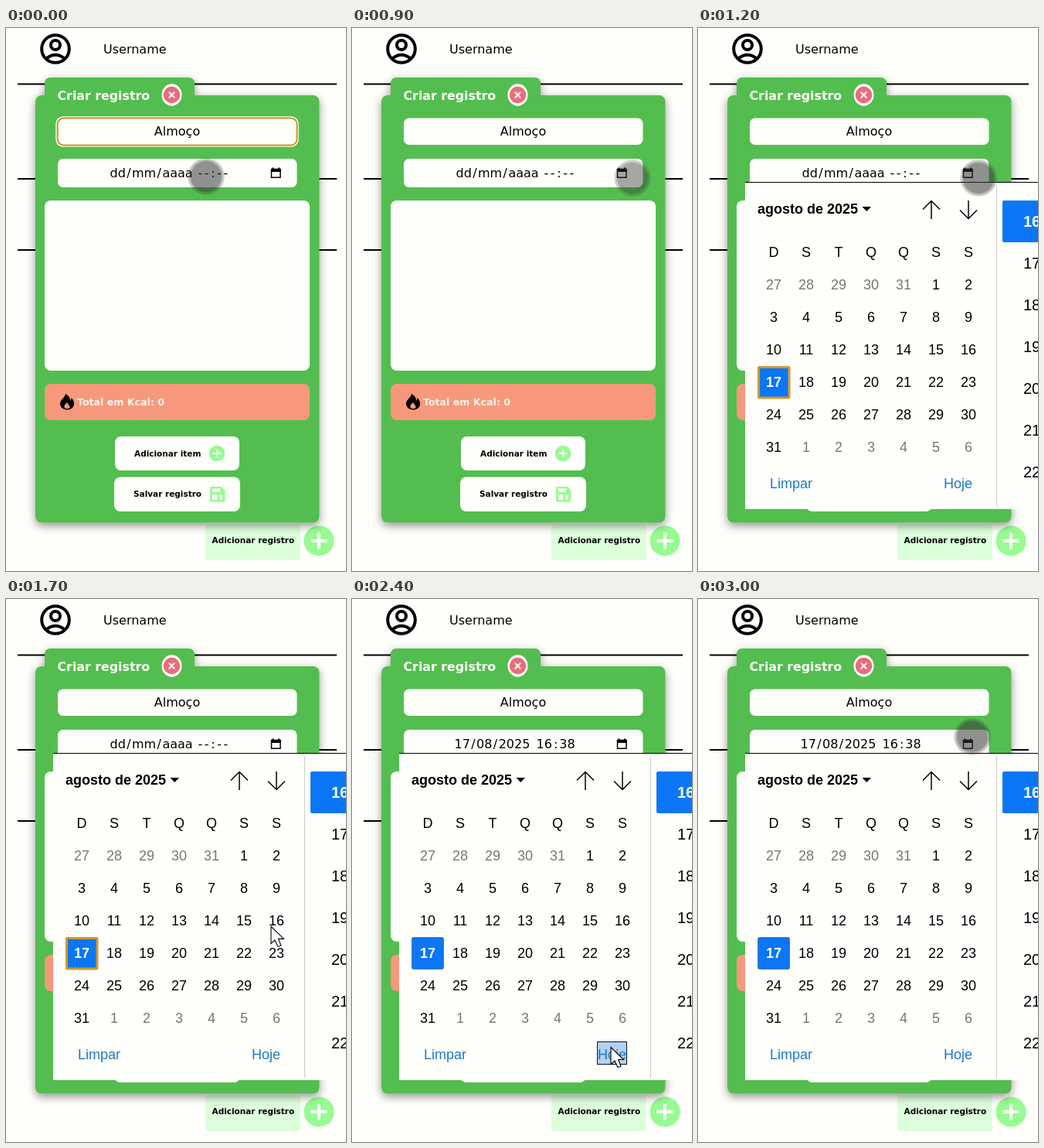
An HTML page that plays this animation: 440 by 702 pixels, repeating every 3100 ms.

```html
<!DOCTYPE html>
<html lang="pt-BR">
<head>
<meta charset="utf-8">
<title>Criar registro</title>
<style>
html, body { margin: 0; width: 100%; height: 100%; overflow: hidden; background: #fefefb; }
svg { display: block; width: 440px; height: 702px; }
text { font: 16px "DejaVu Sans", sans-serif; }
.mid { text-anchor: middle; }
.title { font-weight: bold; font-size: 15.8px; fill: #fefefb; }
.kcal { font-weight: bold; font-size: 12.6px; fill: #fff6ee; }
.label { font-weight: bold; font-size: 10.5px; }
.paper { fill: #fefefb; }
.green { fill: #52be50; }
.mint { fill: #98fb92; }
.blue { fill: #0b76f6; }
.line { fill: none; stroke: #000; }
.plus { fill: none; stroke: #fefefb; stroke-linecap: round; }
#popup text { font: 18px "Liberation Sans", Arial, sans-serif; }
#popup .bold { font-weight: bold; }
#popup .hour { font-size: 20px; }
#popup .link { fill: #1c78c4; }
#popup .dim { fill: #767676; }
#popup .on { fill: #fff; font-weight: bold; }
</style>
</head>
<body>
<svg viewBox="0 0 440 702">
  <defs>
    <filter id="shadow" x="-10%" y="-10%" width="120%" height="120%">
      <feDropShadow dx="0" dy="4" stdDeviation="6" flood-color="#000" flood-opacity=".42"/>
    </filter>
    <radialGradient id="touch">
      <stop offset="0" stop-color="#333" stop-opacity=".54"/>
      <stop offset=".8" stop-color="#333" stop-opacity=".54"/>
      <stop offset=".84" stop-color="#333" stop-opacity=".4"/>
      <stop offset="1" stop-color="#333" stop-opacity=".14"/>
    </radialGradient>
  </defs>
  <rect class="paper" width="440" height="702"/>

  <g class="line" stroke-width="4">
    <circle cx="64" cy="27" r="17.8"/>
    <circle cx="64" cy="22" r="6"/>
    <path d="M52 39.5Q64 30 76 39.5"/>
  </g>
  <text x="126" y="33">Username</text>
  <path class="line" stroke-width="2" d="M15 72.5H428M15 195H428M15 287H428"/>

  <rect x="258" y="642" width="123" height="46" rx="4" fill="#dcfedb"/>
  <text class="label" x="266.5" y="666">Adicionar registro</text>
  <circle class="mint" cx="405" cy="663" r="19.6"/>
  <path class="plus" stroke-width="4" d="M396 663h18M405 654v18"/>

  <g class="green" filter="url(#shadow)">
    <rect x="38" y="87" width="367.5" height="552.5" rx="8"/>
    <path d="M50 92V72q0-8 8-8H236q8 0 8 8V92Z"/>
  </g>
  <text class="title" x="66.5" y="93">Criar registro</text>
  <ellipse class="paper" cx="214.5" cy="86.5" rx="13" ry="14.2"/>
  <circle cx="214.5" cy="86.5" r="10.7" fill="#e96d7b"/>
  <path class="plus" stroke-width="2" d="M211.3 83.3l6.4 6.4m0-6.4l-6.4 6.4"/>

  <g class="paper">
    <rect x="67" y="116.5" width="309.5" height="34.5" rx="7"/>
    <rect x="67" y="169" width="309.5" height="37" rx="7"/>
    <rect x="50" y="223" width="343" height="220" rx="8"/>
    <rect x="141" y="528" width="161" height="44" rx="8"/>
    <rect x="140" y="580.5" width="163" height="44.5" rx="8"/>
  </g>
  <g id="focus" fill="none">
    <rect x="65" y="115" width="313" height="38" rx="9" stroke="#fefefb" stroke-width="1.5"/>
    <rect x="66.8" y="116.5" width="309.7" height="35" rx="8" stroke="#d8962a" stroke-width="2"/>
  </g>
  <text class="mid" x="221.5" y="139">Almoço</text>
  <g id="empty">
    <text x="134.5" y="193" dx="0 0 1.4 1.4 0 1.4 1.4">dd/mm/aaaa</text>
    <text x="248.5" y="193" letter-spacing="2.6">--:--</text>
  </g>
  <g id="filled">
    <text x="132.5" y="193" dx="0 0 1.4 1.4 0 1.4 1.4">17/08/2025</text>
    <text x="238.5" y="193" dx="0 0 2 2">16:38</text>
  </g>
  <path class="line" stroke-width="1.5" d="M343.5 182.5h11.5v10.8h-11.5Z"/>
  <path d="M343 182h12.5v4H343ZM344.5 180.5h2v2h-2ZM352 180.5h2v2h-2Z"/>

  <rect x="50" y="460" width="343" height="47" rx="8" fill="#f7987c"/>
  <path d="M77 473c6 3 6 7 6 9c1-1 1.500-2 1.500-4c3 3 4 6 3.500 9c-.8 4-4 6.500-9 6.500c-6 0-9-4-9-8c0-5 6-7 7-12.500ZM79 484c-3 3-4 4-3.500 6c1 3 6.500 3 7 0c.3-2-2-3-3.500-6Z" fill-rule="evenodd"/>
  <text class="kcal" x="92" y="488">Total em Kcal: 0</text>

  <text class="label" x="166" y="554">Adicionar item</text>
  <circle class="mint" cx="273" cy="550" r="10.3"/>
  <path class="plus" stroke-width="2" d="M268.500 550h9M273 545.500v9"/>
  <text class="label" x="165" y="606">Salvar registro</text>
  <path class="mint" d="M266 593h13l4.500 4.500V610q0 2.500-2.500 2.500H266q-2 0-2-2.500V595q0-2 2-2Z"/>
  <path class="paper" d="M267 595.500h10v4.500h-10ZM267 603h13v7h-13Z"/>
  <path class="mint" d="M273.500 603h3v7h-3Z"/>

  <rect id="blank" x="64" y="202" width="376" height="423"/>

  <g id="popup">
    <rect class="paper" x="61" y="199" width="379" height="423"/>
    <path class="line" d="M61 199.500H440"/>
    <path d="M386.500 203V619" stroke="#ccc"/>
    <text class="bold" x="77" y="240">agosto de 2025</text>
    <path d="M212.500 231h11.500l-5.700 6Z"/>
    <path class="line" stroke-width="1.500" d="M302 247V223.500M291 234.500l11-11l11 11M350 223V246.500M339 235.500l11 11l11-11"/>
    <rect class="blue" x="77.500" y="437.500" width="41" height="41" rx="2" stroke="#5f7590"/>
    <rect id="ring" x="78.500" y="438.500" width="39.500" height="39.500" rx="1.500" fill="none" stroke="#d3972a" stroke-width="3"/>
    <rect class="blue" x="394" y="223" width="50" height="54" rx="2"/>
    <rect id="hover" x="317.500" y="572.500" width="38" height="29" fill="#b3d0f0" stroke="#111"/>
    <text class="link" x="93" y="595">Limpar</text>
    <text class="link" x="318" y="595">Hoje</text>
  </g>

  <g id="pointer">
    <circle id="dot" r="24" fill="url(#touch)"/>
    <path id="arrow" d="M0 0V22L5 17.500L9 26L13 24.500L9.500 16H16.500Z" fill="#fff" stroke="#000" stroke-width="1.100"/>
  </g>
</svg>
<script>
const LOOP = 3100, STEP = 100;
const PRESS = 900, FLASH = 1000, OPEN = 1200, SET = 2400;
const $ = id => document.getElementById(id);

function put(str, x, y, cls) {
  const el = document.createElementNS("http://www.w3.org/2000/svg", "text");
  el.textContent = str;
  el.setAttribute("x", x);
  el.setAttribute("y", y);
  el.setAttribute("class", cls);
  $("popup").append(el);
}

[..."DSTQQSS"].forEach((d, i) => put(d, 98 + 42 * i, 296, "mid"));
for (let i = 0; i < 42; i++) {
  const n = i - 4;
  const day = n < 1 ? n + 31 : n > 31 ? n - 31 : n;
  const cls = n === 17 ? "on" : day !== n ? "dim" : "";
  put(day, 98 + 42 * (i % 7), 338 + 42 * Math.floor(i / 7), "mid " + cls);
}
for (let i = 0; i < 7; i++) put(16 + i, 421, 257 + 54 * i, i ? "hour" : "hour on");

// Pointer waypoints: time, x, y
const path = [
  [0, 259, 192], [500, 376, 191], [600, 394, 191], [900, 363, 194], [1300, 363, 194],
  [2000, 330, 575.5], [2400, 335, 579.5], [2500, 336, 579.5],
  [2800, 372, 300], [3000, 355, 178], [LOOP, 355, 178]
];

const slope = (i, a) => (path[i + 1][a] - path[i][a]) / (path[i + 1][0] - path[i][0]);

// Speed at a waypoint: zero at rests and turns, else the mean of both sides
function speed(i, a) {
  if (i === 0 || i === path.length - 1) return 0;
  const l = slope(i - 1, a), r = slope(i, a);
  return l * r > 0 ? 2 * l * r / (l + r) : 0;
}

function locate(t, a) {
  const i = path.findIndex(p => p[0] > t) - 1;
  const d = path[i + 1][0] - path[i][0];
  const k = (t - path[i][0]) / d, e = k * k * (3 - 2 * k);
  return path[i][a] * (1 - e) + path[i + 1][a] * e +
    d * k * (1 - k) * ((1 - k) * speed(i, a) - k * speed(i + 1, a));
}

const show = (id, on) => { $(id).style.display = on ? "" : "none"; };

function draw() {
  const t = Math.floor(performance.now() % LOOP / STEP) * STEP;
  const x = locate(t, 1), y = locate(t, 2);
  const inside = t >= OPEN && y > 199;
  $("pointer").setAttribute("transform", `translate(${x} ${y})`);
  $("dot").setAttribute("opacity", t >= PRESS && t < OPEN ? 0.8 : 1);
  show("dot", !inside);
  show("arrow", inside);
  show("focus", t < PRESS);
  show("blank", t >= FLASH && t < OPEN);
  show("popup", t >= OPEN);
  show("empty", t < SET);
  show("filled", t >= SET);
  show("ring", t < SET);
  show("hover", inside && x > 317 && x < 356 && y > 572 && y < 602);
  requestAnimationFrame(draw);
}
draw();
</script>
</body>
</html>
```
